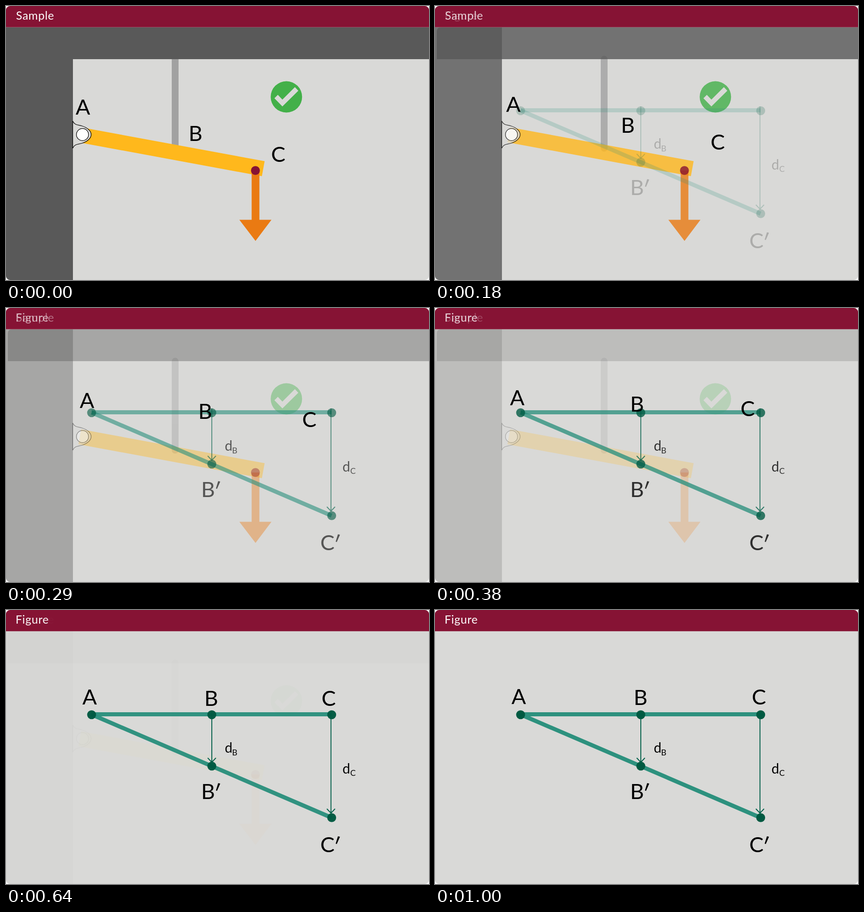
These frames come from a looping animation (929 by 603 pixels, 1.04 s). An HTML page:

```html
<!DOCTYPE html>
<html lang="en">
<head>
<meta charset="utf-8">
<title>Lever diagram</title>
<style>
  html, body { margin: 0; width: 100%; height: 100%; overflow: hidden; background: #fff; }
  svg { display: block; width: 929px; height: 603px; }
  text { font: 47px Lato, sans-serif; }
  .label { text-anchor: middle; }
  .title { font-size: 25px; letter-spacing: .75px; fill: #fff; }
  .d { font-size: 30px; }
  .sub { font-size: 18px; }
  .bar { fill: #595959; }
  .beam { stroke: #2d917e; stroke-width: 9; }
  .gap { stroke: #005f48; stroke-width: 2; fill: none; }
  .dot { fill: #005a42; }
  .mount { stroke: #000; stroke-width: 1.3; }
</style>
</head>
<body>
<svg viewBox="0 0 929 603">
  <clipPath id="card"><rect width="929" height="603" rx="9"/></clipPath>
  <g clip-path="url(#card)">
    <rect width="929" height="603" fill="#d9d9d7"/>
    <g id="before">
      <path d="M371.5 117V313" stroke="#a1a1a1" stroke-width="15" stroke-linecap="round"/>
      <rect class="bar" y="47" width="147" height="556"/>
      <path class="bar" d="M4 117V56Q4 47 13 47H929V117Z"/>
      <path fill="#ffb81c" d="M165 267 568 341.500 562 374.500 159 300Z"/>
      <path class="mount" fill="#d9d9d7" d="M146.500 253C151 263 158 261 167 264C179 268 187 275 187 283C187 291 179 298 167 302C158 305 151 303 146.500 313Z"/>
      <circle class="mount" cx="168" cy="283" r="13.300" fill="#fff"/>
      <path fill="#ea7a12" d="M539.500 362H556.500V470.500H583L548 517 512.500 470.500H539.500Z"/>
      <circle cx="547.800" cy="362" r="9.800" fill="#861334"/>
      <path fill="#43b049" fill-rule="evenodd" d="M581.300 200a34.500 34.500 0 0 1 69 0a34.500 34.500 0 0 1-69 0ZM589.500 203 597 195.500 607 206 634.500 178.500 642 186.500 607 221Z"/>
    </g>
    <g id="after">
      <path class="beam" d="M188 229.500H715"/>
      <path class="beam" d="M188 230 715 457"/>
      <path class="gap" d="M452 221V335M443 325.500 452 335 461 325.500"/>
      <path class="gap" d="M713.700 221V447M704.700 437.500 713.700 447 722.700 437.500"/>
      <circle class="dot" cx="188" cy="230.500" r="9.800"/>
      <circle class="dot" cx="452" cy="230.500" r="9.800"/>
      <circle class="dot" cx="715.300" cy="230.500" r="9.800"/>
      <circle class="dot" cx="452" cy="343.500" r="9.800"/>
      <circle class="dot" cx="715.300" cy="457" r="9.800"/>
      <text class="label" x="443.700" y="416">B</text>
      <path d="M466 381l4.500 1-7 16-2.500-.8z"/>
      <text class="label" x="706" y="533">C</text>
      <path d="M729 498l4.500 1-7 16-2.500-.8z"/>
      <text class="d" x="480.500" y="314">d</text>
      <text class="sub" x="496.500" y="320">B</text>
      <text class="d" x="739" y="360">d</text>
      <text class="sub" x="756" y="365">C</text>
    </g>
    <rect width="929" height="46.700" fill="#861334"/>
    <text class="title" id="titleBefore" x="22" y="30">Sample</text>
    <text class="title" id="titleAfter" x="21" y="30">Figure</text>
    <text class="label moving">A</text>
    <text class="label moving">B</text>
    <text class="label moving">C</text>
  </g>
</svg>
<script>
const LOOP = 1040;
// [time in ms, progress of the transition]
const ease = [[0, 0], [99, 0], [100, .03], [180, .2], [250, .415], [290, .6],
              [380, .78], [480, .9], [560, .95], [640, .975], [800, .993], [1000, 1], [LOOP, 1]];
// start x, y and end x, y of the labels A, B and C
const paths = [[169, 239, 184, 207], [416.2, 297, 451.5, 208.5], [598, 343, 711.5, 208]];

const mix = (a, b, k) => a + (b - a) * k;
const find = id => document.getElementById(id);
const labels = document.querySelectorAll('.moving');
const leaving = [...find('before').children, find('titleBefore')];
const entering = [...find('after').children, find('titleAfter')];

function progress(t) {
  const i = ease.findIndex(point => point[0] > t);
  const [t0, p0] = ease[i - 1], [t1, p1] = ease[i];
  return mix(p0, p1, (t - t0) / (t1 - t0));
}

function draw() {
  const p = progress(performance.now() % LOOP);
  // each shape fades on its own, so overlaps stay visible
  leaving.forEach(el => el.setAttribute('opacity', 1 - p));
  entering.forEach(el => el.setAttribute('opacity', p));
  paths.forEach(([x0, y0, x1, y1], i) => {
    labels[i].setAttribute('x', mix(x0, x1, p));
    labels[i].setAttribute('y', mix(y0, y1, p));
  });
  requestAnimationFrame(draw);
}
draw();
</script>
</body>
</html>
```
